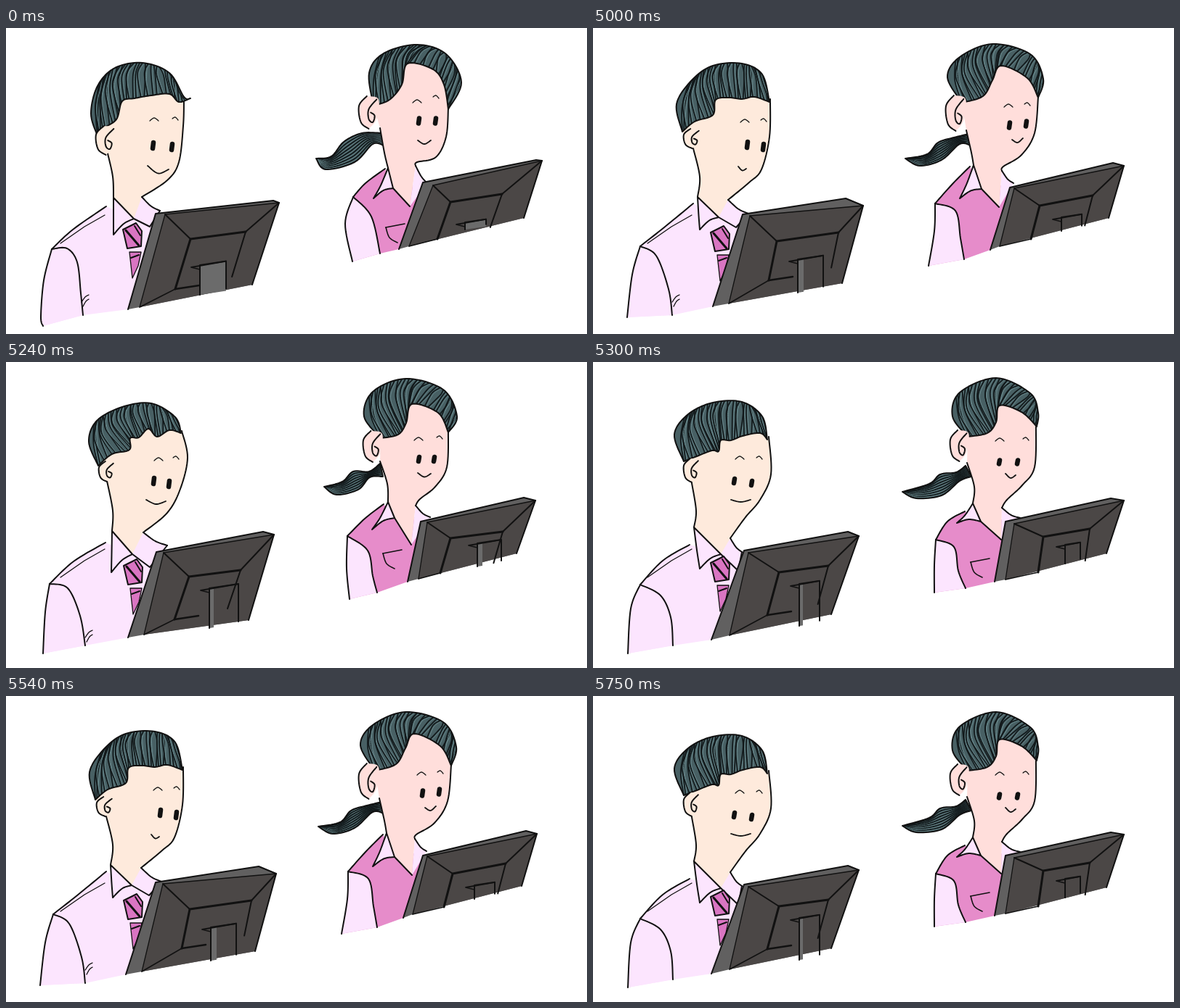
An HTML page with a canvas for the animation above (5900 ms loop, 800 by 422 pixels).

```html
<!DOCTYPE html>
<html lang="en">
<head>
<meta charset="utf-8">
<title>Two office workers</title>
<style>
html, body { margin: 0; width: 100%; height: 100%; overflow: hidden; background: #fff; }
canvas { display: block; }
</style>
</head>
<body>
<canvas width="800" height="422"></canvas>
<script>
const ctx = document.querySelector('canvas').getContext('2d');
const INK = '#111', SHIRT = '#fce5fe', VEST = '#e68cca', TIE = '#d975c2', HAIR = '#486064';
const SIDE = '#616060', SCREEN = '#4b4746', STAND = '#6b6b6b';
const HOLD = 5000, STEP = 150, LOOP = 5900;

const mix = (a, b, k) => [a[0] + (b[0] - a[0]) * k, a[1] + (b[1] - a[1]) * k];
const shift = ([x, y], dx, dy) => [x + dx, y + dy];
const at = (line, k) => line[Math.round(k * (line.length - 1))];
const last = line => line[line.length - 1];
const flip = line => [...line].reverse();

function points(text) {
  const v = text.split(' ').map(Number);
  return v.filter((_, i) => i % 2 === 0).map((x, i) => [x, v[2 * i + 1]]);
}

// Smooth line through all points (Catmull-Rom).
function smooth(p) {
  const out = [p[0]];
  for (let i = 0; i < p.length - 1; i++) {
    const a = p[i - 1] || p[i], b = p[i], c = p[i + 1], d = p[i + 2] || c;
    for (let s = 1; s <= 10; s++) {
      const t = s / 10;
      out.push([0, 1].map(n => b[n] + t / 2 * (c[n] - a[n] +
        t * (2 * a[n] - 5 * b[n] + 4 * c[n] - d[n] + t * (3 * b[n] - a[n] - 3 * c[n] + d[n])))));
    }
  }
  return out;
}

const curve = text => smooth(points(text));
const arc = (a, b, bend) => smooth([a, shift(mix(a, b, .5), 0, bend), b]);

function trace(line) {
  ctx.beginPath();
  line.forEach(p => ctx.lineTo(...p));
}
function fill(line, color) {
  trace(line);
  ctx.fillStyle = color;
  ctx.fill();
}
function stroke(line, width = 2, color = INK) {
  trace(line);
  ctx.lineWidth = width;
  ctx.strokeStyle = color;
  ctx.stroke();
}
function shape(line, color, width = 2) {
  fill(line, color);
  stroke([...line, line[0]], width);
}

function lock(outer, inner, strand, count) {
  const edge = [...outer, ...inner];
  fill(edge, HAIR);
  ctx.save();
  trace(edge);
  ctx.clip();
  for (let i = 0; i < count; i++) {
    const line = smooth(strand(i / (count - 1), 3 * Math.sin(i * 2.4)));
    stroke(line, 1.7, '#12191b');
    stroke(line.map(p => shift(p, 2, 1)), 1, '#67868a');
  }
  ctx.restore();
  stroke([...edge, outer[0]]);
}

// Strands fan out from the crown to the hairline.
function hair(outer, inner) {
  lock(outer, inner, (k, wave) => {
    const from = at(outer, .3 + .5 * k), to = at(inner, 1 - k);
    return [from, shift(mix(mix(from, to, .5), at(outer, .15 + .7 * k), .35), wave, 0), to];
  }, 34);
}

// Strands run along the ponytail.
function ponytail(upper, lower) {
  lock(upper, lower, k => [0, .25, .5, .75, 1].map(u => mix(at(upper, u), at(lower, 1 - u), k)), 9);
}

function ear(text, skin) {
  const [[x, y], [w, h]] = points(text);
  const place = s => smooth(points(s).map(p => [x + p[0] * w / 10, y + p[1] * h / 10]));
  const rim = place('4 0 0 3 1 8 5 10');
  fill([...rim, ...place('5 10 9 7 10 1 4 0')], skin);
  stroke(rim);
  stroke(place('9 1 5 4 5 7 7 8 8 6 6 5'));
}

function face(o) {
  const [e1, e2] = points(o.eyes), [b1, b2] = points(o.brows), [m1, m2] = points(o.mouth);
  for (const e of [e1, e2]) stroke([shift(e, 0, -o.eye), shift(e, -1, o.eye)], 6.5);
  stroke(arc(b1, shift(b1, 12, 0), -4), 1.3);
  stroke(arc(b2, shift(b2, 8, 2), -3), 1.3);
  stroke(arc(m1, m2, o.smile), 1.8);
}

function tie(text) {
  const [[x, y]] = points(text);
  const place = s => points(s).map(p => shift(p, x, y));
  shape(place('-14 4 4 -5 12 6 11 27 -8 30'), TIE);
  stroke(place('-10 5 8 26'), 3);
  stroke(place('2 -1 10 12'), 2);
  shape(place('-5 35 11 35 7 54 -1 71'), TIE, 1.3);
  stroke(place('-3 43 8 39'));
}

function monitor(o) {
  const [back, top, right, low, foot, base, front] = points(o.monitor);
  const [p, q, r] = points(o.frame);
  const s = [q[0] + (r[0] - p[0]) * .9, q[1] + (r[1] - p[1]) * .9];
  const [x, y, w, h, grey] = o.stand.split(' ').map(Number);
  const slope = d => y - .15 * d;
  fill([back, top, right, low, foot, base], SIDE);
  fill([front, right, low, foot], SCREEN);
  stroke([base, back, top, right, low]);
  stroke([foot, front, right], 1.3);
  stroke([front, p]);
  stroke([right, q, s]);
  stroke([r, foot], 1.5);
  fill([[x, y], [x + grey, slope(grey)], [x + grey, slope(grey) + h], [x, y + h]], STAND);
  stroke([[x, y + h], [x, y], [x + w, slope(w)], [x + w, slope(w) + h - 3]]);
  stroke([[x, y + 6], [x - 12, y + 3], [x + w, slope(w)]], 1.8);
  stroke([q, p, r], 3);
  if (o.tie) stroke([r, shift(r, 33, -5)], 2.5);
}

function figure(o) {
  const skin = o.tie ? '#feeadc' : '#ffdedb';
  const [crown, fringe, cheek, nape, shoulder, sleeve, arm] =
    [o.crown, o.fringe, o.cheek, o.nape, o.shoulder, o.sleeve, o.arm].map(curve);
  const [tip, mid, tip2, out] = points(o.collar);
  const screen = points(o.monitor);
  const collar = [last(nape), ...arc(last(nape), tip, 3), ...arc(tip, mid, -4)];

  if (o.tail) ponytail(curve(o.tail), curve(o.under));
  fill([...shoulder, ...sleeve, last(arm), screen[5], screen[0], out, mid], o.tie ? SHIRT : VEST);
  fill([...sleeve, ...flip(arm)], SHIRT);
  [shoulder, sleeve, arm].forEach(line => stroke(line));
  if (o.tie) stroke(points('136 258 108 274 75 297'), 1.3);
  if (o.crease) {
    const [c] = points(o.crease);
    for (const d of [0, 6]) stroke(arc(shift(c, d / 3, d), shift(c, 10, d - 10), -2), 1.3);
  }

  fill([...cheek, tip2, mid, ...flip(nape), ...flip(fringe)], skin);
  stroke(cheek);
  stroke(nape);
  shape(collar, SHIRT);
  const flap = [...arc(last(cheek), out, 3), tip2];
  fill(o.tie ? [...flap, mid] : flap, SHIRT);
  stroke(flap.slice(0, -1));
  stroke(o.tie ? [out, tip2, mid] : [mid, tip2]);
  if (o.tie) tie(o.tie);
  if (o.pocket) {
    const [p] = points(o.pocket);
    stroke([p, shift(p, 26, -5)], 1.6);
    stroke(smooth([p, shift(p, 5, 14), shift(p, 16, 21)]), 1.6);
  }
  monitor(o);
  hair(crown, fringe);
  ear(o.ear, skin);
  face(o);
}

const manCalm = () => figure({
  crown: '126 149 117 118 126 80 150 55 188 48 225 62 245 95 254 97',
  fringe: '254 97 238 102 225 91 200 93 177 97 160 101 152 126 133 139 126 149',
  cheek: '245 98 244 135 238 185 222 210 187 233', nape: '140 173 147 205 148 234',
  ear: '124 135 27 40', eyes: '203 162 229 164', eye: 4, brows: '198 128 229 125',
  mouth: '195 190 224 195', smile: 8,
  shoulder: '138 246 92 278 63 305', sleeve: '63 305 52 348 48 398 51 411',
  arm: '63 305 84 304 98 323 103 366 106 396', crease: '104 378',
  collar: '148 285 176 263 198 274 212 252', tie: '175 274',
  monitor: '206 256 368 238 376 241 339 354 184 385 168 388 219 257',
  frame: '254 291 330 281 233 360', stand: '267 327 36 41 36'
});

const manLean = () => figure({
  crown: '123 143 115 105 136 72 165 52 205 49 233 64 243 102',
  fringe: '243 102 222 95 205 98 188 96 169 99 165 120 140 129 123 143',
  cheek: '244 98 243 150 232 195 215 213 186 237', nape: '138 166 147 205 144 233',
  ear: '125 139 23 27', eyes: '213 161 235 164', eye: 4, brows: '203 130 231 127',
  mouth: '200 191 211 194', smile: 4,
  shoulder: '138 242 98 275 65 301', sleeve: '65 301 54 340 47 399',
  arm: '65 301 87 314 104 360 109 396', crease: '109 378',
  collar: '147 278 173 261 197 275 214 256', tie: '176 278',
  monitor: '206 257 348 235 372 245 343 352 187 380 165 384 216 259',
  frame: '253 294 338 282 242 348', stand: '282 319 35 46 8'
});

const manLow = () => figure({
  crown: '127 143 114 110 125 81 160 62 200 57 233 76 241 98',
  fringe: '241 98 225 94 208 103 196 92 183 104 171 105 170 121 146 127 127 143',
  cheek: '242 95 250 132 240 175 222 208 189 235', nape: '139 164 147 205 146 233',
  ear: '128 137 22 28', eyes: '204 164 225 168', eye: 4, brows: '204 136 230 132',
  mouth: '193 190 220 192', smile: 5,
  shoulder: '137 249 93 275 60 306', sleeve: '60 306 54 345 51 402',
  arm: '60 306 85 312 102 350 109 391', crease: '109 380',
  collar: '145 290 174 265 198 283 222 253', tie: '176 277',
  monitor: '207 262 354 234 369 238 334 356 190 376 168 380 217 263',
  frame: '252 296 323 287 232 355', stand: '280 312 40 55 6'
});

const manTurn = () => figure({
  crown: '125 137 112 100 131 72 165 56 205 55 233 75 240 107',
  fringe: '240 107 230 98 206 102 190 108 176 108 173 123 164 122 143 130 125 137',
  cheek: '242 103 245 155 230 190 210 214 189 243', nape: '136 167 142 205 139 228',
  ear: '125 133 22 33', eyes: '195 164 219 167', eye: 3, brows: '196 134 225 132',
  mouth: '190 190 217 190', smile: 3,
  shoulder: '133 252 96 274 65 307', sleeve: '65 307 52 340 48 402',
  arm: '65 307 93 322 107 352 110 391',
  collar: '147 285 176 265 200 288 205 262', tie: '176 273',
  monitor: '208 260 351 234 366 240 328 348 188 377 163 383 214 263',
  frame: '256 290 324 281 240 349', stand: '284 306 28 58 5'
});

const womanCalm = () => figure({
  crown: '506 107 500 62 520 35 566 23 606 36 627 75 609 112',
  fringe: '609 112 603 78 588 57 553 49 545 78 528 99 506 107',
  tail: '518 145 490 145 465 157 448 177 427 180', under: '427 180 440 195 480 185 505 160 520 162',
  cheek: '609 110 606 150 592 178 566 185 564 190', nape: '515 138 521 172 526 193',
  ear: '486 94 27 45', eyes: '569 128 592 128', eye: 3.5, brows: '560 103 588 95',
  mouth: '567 155 585 155', smile: 5,
  shoulder: '522 194 495 214 478 233', sleeve: '478 233 467 270 477 322',
  arm: '478 233 503 260 515 311', pocket: '523 275',
  collar: '506 235 533 221 556 246 580 214',
  monitor: '574 213 730 182 738 183 713 262 555 301 541 305 588 217',
  frame: '612 240 683 229 594 291', stand: '632 268 29 10 29'
});

const womanLean = () => figure({
  crown: '508 103 488 68 505 40 550 22 602 36 620 70 613 96',
  fringe: '613 96 598 69 562 52 550 72 537 94 508 103',
  tail: '518 146 497 151 475 158 460 174 430 180', under: '430 180 450 190 480 182 505 160 520 162',
  cheek: '613 95 608 145 590 175 565 191 563 197', nape: '514 141 521 172 524 189',
  ear: '486 93 27 49', eyes: '574 134 597 132', eye: 3.5, brows: '566 109 594 105',
  mouth: '577 154 592 152', smile: 5,
  shoulder: '519 191 496 214 471 242', sleeve: '471 242 470 280 462 328',
  arm: '471 242 499 252 506 290 511 319',
  collar: '505 235 535 222 559 247 579 214',
  monitor: '574 220 716 186 731 190 710 262 560 301 547 306 580 221',
  frame: '615 245 688 231 603 291', stand: '645 261 28 19 0'
});

const womanLow = () => figure({
  crown: '516 105 493 75 505 41 550 23 602 38 621 75 609 97',
  fringe: '609 97 595 70 559 58 551 84 540 100 516 105',
  tail: '515 140 500 151 478 151 463 165 438 172', under: '438 172 455 183 485 176 501 159 519 158',
  cheek: '609 94 607 145 591 172 570 189 564 198', nape: '515 137 525 168 526 193',
  ear: '492 95 26 43', eyes: '569 134 590 134', eye: 3, brows: '562 108 593 104',
  mouth: '567 153 585 154', smile: 5,
  shoulder: '520 196 494 216 470 240', sleeve: '470 240 469 285 473 327',
  arm: '470 240 498 260 505 295 511 318', pocket: '519 264',
  collar: '504 231 535 215 558 252 584 214',
  monitor: '571 220 713 187 729 191 703 264 568 299 553 303 580 221',
  frame: '612 243 684 234 598 291', stand: '649 250 33 32 7'
});

const womanTurn = () => figure({
  crown: '516 103 495 75 505 42 555 22 602 43 613 70 611 89',
  fringe: '611 89 590 69 560 60 555 83 543 98 516 103',
  tail: '513 143 500 152 478 155 463 168 426 179', under: '426 179 445 188 480 184 505 164 521 158',
  cheek: '610 88 608 145 591 170 570 190 563 201', nape: '515 139 525 172 523 195',
  ear: '492 94 25 43', eyes: '560 138 585 138', eye: 2.5, brows: '554 109 592 106',
  mouth: '568 154 582 156', smile: 5,
  shoulder: '512 206 488 220 472 245', sleeve: '472 245 470 280 470 318',
  arm: '472 245 497 255 503 288 513 312', pocket: '520 276',
  collar: '501 222 534 220 562 245 588 215',
  monitor: '568 220 713 188 731 191 707 264 568 300 553 303 580 223',
  frame: '620 241 684 230 613 290', stand: '650 252 21 26 0'
});

const poses = [[manCalm, womanCalm], [manLean, womanLean], [manLow, womanLow], [manTurn, womanTurn]];
const start = performance.now();
let shown = -1;

function tick() {
  const t = (performance.now() - start) % LOOP;
  const pose = t < HOLD ? 0 : 1 + Math.floor((t - HOLD) / STEP) % 3;
  if (pose !== shown) {
    ctx.clearRect(0, 0, 800, 422);
    poses[pose].forEach(paint => paint());
    shown = pose;
  }
  requestAnimationFrame(tick);
}

ctx.lineCap = ctx.lineJoin = 'round';
tick();
</script>
</body>
</html>
```
